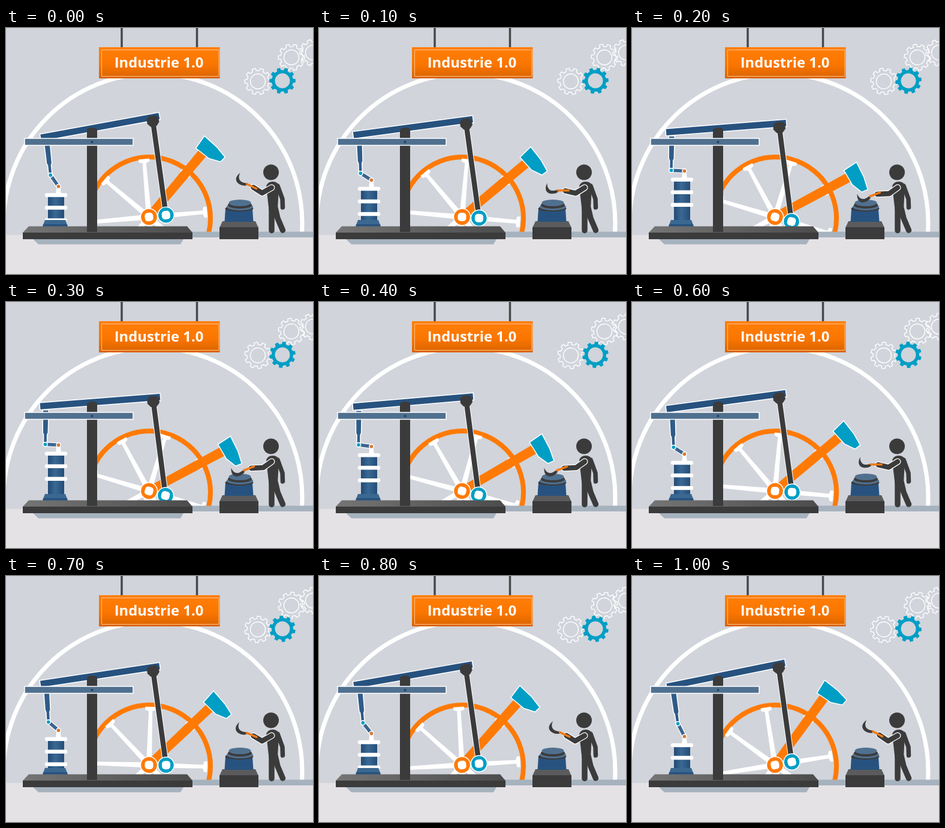
Recreate the animation shown at these times as an HTML page. Size 512 by 410 pixels, loop 1.1 s.

```html
<!DOCTYPE html>
<html lang="de">
<head>
<meta charset="utf-8">
<title>Industrie 1.0</title>
<style>
html, body { margin: 0; width: 100%; height: 100%; overflow: hidden; }
svg { display: block; width: 512px; height: 410px; }
.dark { fill: #3b3b3c; }
.navy { fill: #27527f; }
.steel { fill: #50708f; }
.cyan { fill: #009ec5; }
.orange { fill: #ff7a05; }
.edge { stroke: #fff; stroke-width: 1.5; }
.line { fill: none; stroke: #fff; }
.limb { fill: none; stroke: #3b3b3c; stroke-linecap: round; stroke-linejoin: round; }
text { font: bold 23.8px "Open Sans", "Noto Sans", sans-serif; fill: #fff; text-anchor: middle; }
</style>
</head>
<body>
<svg viewBox="0 0 512 410">
  <defs>
    <linearGradient id="signFill" x2="0" y2="1">
      <stop stop-color="#ff7f08"/><stop offset=".55" stop-color="#fb7600"/><stop offset="1" stop-color="#d96400"/>
    </linearGradient>
    <linearGradient id="drumFill">
      <stop stop-color="#224a74"/><stop offset=".45" stop-color="#3a6994"/><stop offset="1" stop-color="#234d78"/>
    </linearGradient>
    <linearGradient id="baseFill">
      <stop stop-color="#757575"/><stop offset="1" stop-color="#4c4c4d"/>
    </linearGradient>
    <clipPath id="wheelClip"><path d="M152 200H360V340H152z"/></clipPath>
    <clipPath id="drumClip"><path d="M50 220H120V321H50z"/></clipPath>
  </defs>

  <path fill="#d1d4db" d="M0 0H512V410H0z"/>
  <circle class="line" cx="245" cy="325" r="249" stroke-width="7"/>
  <g id="gears"></g>

  <path d="M193 0V33M318.500 0V33" stroke="#47484a" stroke-width="3.500"/>
  <path fill="url(#signFill)" d="M155 32H356.500V84H155z"/>
  <path fill="none" stroke="#ffc48c" d="M159.500 36.500H355V80.500H159.500z"/>
  <text x="255" y="66">Industrie 1.0</text>

  <g clip-path="url(#wheelClip)">
    <circle cx="239" cy="317" r="102" fill="none" stroke="#ff7a05" stroke-width="8"/>
    <g id="spokes"></g>
  </g>

  <path fill="#e5e2e6" d="M0 345H512V410H0z"/>
  <path fill="#a6b2be" d="M305 339.500H512V349H305zM45 352H296L291 360.500H54z"/>

  <g id="hammer">
    <path class="orange" d="M0-7L140-8V8L0 7z"/>
    <path class="cyan edge" stroke-width="2" d="M138-14L163-16 162 12 158 33 147 32 139 14z"/>
    <circle class="orange edge" r="14"/>
    <rect class="nut" x="-7" y="-7" width="14" height="14" rx="5" fill="#fff"/>
  </g>

  <g clip-path="url(#drumClip)"><g id="drum">
    <path fill="#fff" d="M84.500 0H90.500L92 14H83z"/>
    <path fill="url(#drumFill)" d="M70 15H97V90H70z"/>
    <path class="line" stroke-width="6.500" stroke-linecap="round" d="M68 14.500H99M68 35.500H99M68 56.500H99"/>
  </g></g>
  <path fill="#3b6890" d="M65 320H99L102 328H62z"/>
  <path class="navy" d="M62 327H102L104 335.500H60z"/>

  <g id="beam">
    <path class="navy edge" d="M-88-6H114V6H-88z"/>
  </g>
  <g id="arm"><path class="edge" fill="#2f5b88" d="M-5 0H5L4.500 38 3 41V57H-3V41L-4.500 38z"/></g>
  <path class="fore line" stroke-width="8" stroke-linecap="round"/>
  <path class="fore line" style="stroke:#3b6590" stroke-width="5.500" stroke-linecap="round"/>
  <circle id="elbow" class="cyan edge" r="3.600"/>
  <circle id="pin" fill="#d47a35" class="edge" r="3.600"/>

  <path class="rod line" stroke-width="10.500"/>
  <path class="rod limb" stroke-width="8.500"/>
  <g id="joint"><path class="dark" d="M-10-5L-5-9H6L10-5V3L5 9H-5L-10 3z"/></g>
  <g id="crank">
    <circle class="cyan edge" r="13.500"/>
    <rect class="nut" x="-7" y="-7" width="14" height="14" rx="5" fill="#fff"/>
  </g>

  <path fill="url(#baseFill)" d="M38 330.500H302L311 341H28z"/>
  <path class="dark" d="M28 341H311V352H28z"/>
  <path class="dark" d="M135 340V170Q136 166 144 166T152 170V340z"/>
  <path class="steel edge" d="M31 184H212V195.500H31z"/>
  <circle cx="143.500" cy="190" r="2" fill="#24415f"/>

  <path fill="#5b5b5d" d="M361 322H416L421 333H356z"/>
  <path class="dark" d="M356 332H421V352H356z"/>
  <path class="navy" d="M366 301H411L412.500 323H364.500z"/>
  <ellipse class="dark" cx="389" cy="301" rx="23.500" ry="5"/>
  <ellipse class="steel" cx="390" cy="298" rx="22" ry="6"/>
  <ellipse class="dark" cx="390" cy="295" rx="20" ry="6"/>
  <ellipse class="steel" cx="390" cy="291.500" rx="18.500" ry="5.500"/>

  <circle class="dark" cx="442" cy="240.500" r="13"/>
  <path class="limb" stroke-width="7.500" d="M453 263L461 285 461.500 299"/>
  <path class="limb" stroke-width="9.500" d="M443 298V337.500M449 300L453 317 461.500 337"/>
  <path class="dark" d="M434 264Q436 256 445 256T455 265L453 303H438.500z"/>
  <path class="reach line" stroke-width="11" stroke-linecap="round" stroke-linejoin="round"/>
  <path class="reach limb" stroke-width="8.500"/>
  <g id="sickle">
    <path class="dark" d="M-9 2C-17 9-37 7-28-12C-28 1-19 3-9-2z"/>
    <path d="M-10 0H8" stroke="#f37a12" stroke-width="3.500" stroke-linecap="round"/>
  </g>
</svg>
<script>
const STEP = 100;
// hammer angle in degrees at each step of the loop
const swing = [50, 40, 28.3, 28.3, 30, 36.3, 40, 43.3, 48.3, 51.5, 54];
const HUB = [238.5, 315];
const TEETH = 10;
const rad = Math.PI / 180;
const $ = id => document.getElementById(id);
const place = (id, [x, y], turn = 0) =>
  $(id).setAttribute("transform", `translate(${x} ${y}) rotate(${turn})`);
const draw = (cls, ...points) => document.querySelectorAll("." + cls)
  .forEach(el => el.setAttribute("d", "M" + points.join("L")));
const polar = ([x, y], r, deg) => [x + r * Math.cos(deg * rad), y - r * Math.sin(deg * rad)];
const mix = (a, b, k) => a.map((v, i) => v + (b[i] - v) * k);

function gearPath() {
  const points = [];
  for (let i = 0; i < TEETH; i++)
    for (const [r, off] of [[18, -11], [22, -7], [22, 7], [18, 11]])
      points.push(polar([0, 0], r, i * 360 / TEETH + off).map(v => v.toFixed(2)));
  return "M" + points.join("L") + "z";
}
const ring = r => `M${r} 0A${r} ${r} 0 1 0 ${-r} 0A${r} ${r} 0 1 0 ${r} 0z`;

// x, y, direction, filled
const gears = [[420, 89, 1], [476, 49, 1], [512, 41, -1], [461, 88, -1, true]];
$("gears").innerHTML = gears.map(([, , , solid], i) =>
  `<path id="gear${i}" d="${gearPath() + ring(12.5)}" fill-rule="evenodd" ` +
  (solid ? 'class="cyan"/>' : 'class="line" stroke-width="1.4"/>')).join("");

$("spokes").innerHTML = Array.from({length: 8}, (_, i) =>
  `<path transform="rotate(${i * 45})" fill="#fff" d="M0-4.500L90-3 92-9H97V9H92L90 3 0 4.500z"/>`).join("");

document.querySelectorAll(".nut").forEach(n => n.setAttribute("transform", "rotate(43)"));

function render(step) {
  const angle = swing[step];
  const u = angle - 42.6;

  gears.forEach(([x, y, dir], i) =>
    place("gear" + i, [x, y], dir * 360 / TEETH * step / swing.length));
  place("spokes", HUB, -angle);
  place("hammer", HUB, -angle);

  const crank = polar(HUB, 28.5, angle - 43.6);
  place("crank", crank, -angle);

  const tilt = 4.7 + (322 - crank[1]) / 103 / rad;
  const onBeam = (x, y) => polar(polar([144, 167], x, tilt), y, tilt - 90);
  place("beam", [144, 167], -tilt);
  const joint = onBeam(101.5, 6.5);
  place("joint", joint, -tilt);
  draw("rod", joint, crank);

  const pin = [87.5, 256.5 + 1.1 * u - 0.012 * u * u];
  const elbow = [70.5 + 0.45 * u + 0.007 * u * u, 243 + 0.33 * u - 0.005 * u * u];
  const top = onBeam(-78.5, 7);
  place("arm", top, Math.atan2(top[0] - elbow[0], elbow[1] - top[1]) / rad);
  place("drum", [0, pin[1]]);
  place("elbow", elbow);
  place("pin", pin);
  draw("fore", elbow, pin);

  // the worker lifts the sickle while the hammer is up
  const lift = Math.min(1, Math.max(0, (angle - 36.3) / 7));
  const sway = lift * (angle - 48.6) * 0.5;
  const hand = mix([406, 277], [410.5, 264.5 - sway * 0.3], lift);
  const bend = mix([429, 276], [427, 275], lift);
  draw("reach", [443, 266], bend, mix(hand, bend, 0.12));
  place("sickle", hand, -22 + 47 * lift + sway);
}

function tick(now) {
  render(Math.floor(now / STEP) % swing.length);
  requestAnimationFrame(tick);
}
render(0);
requestAnimationFrame(tick);
</script>
</body>
</html>
```
